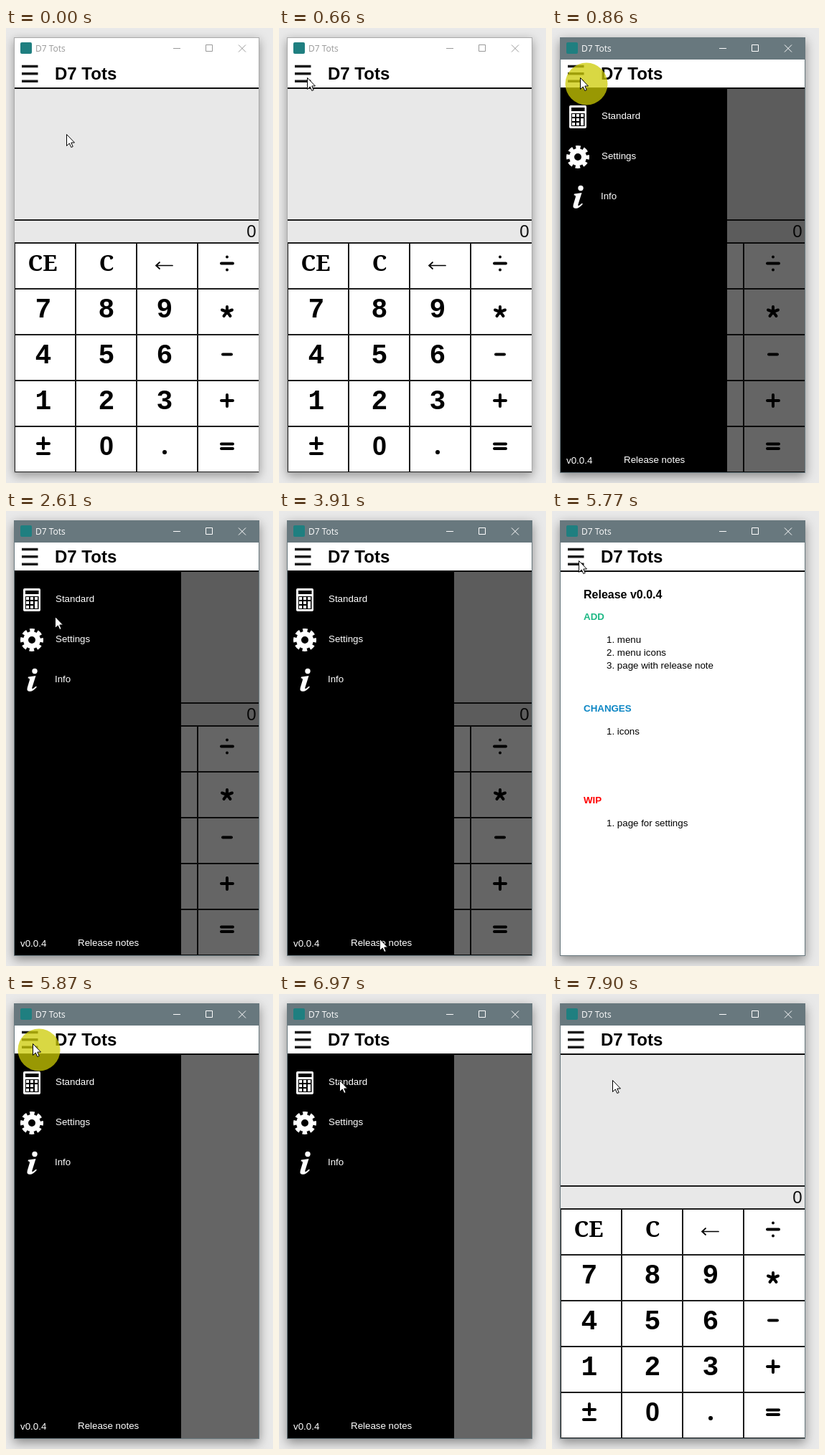
These frames come from a looping animation (372 px wide and 635 px high, 8000 ms). An HTML page:

```html
<!DOCTYPE html>
<html lang="en">
<head>
<meta charset="utf-8">
<title>Calculator</title>
<style>
html, body { margin: 0; width: 100%; height: 100%; overflow: hidden; background: #e9e9e9; }
svg { position: absolute; left: 0; top: 0; }
text { font: 13.333px "Liberation Sans", Arial, sans-serif; }
.b { font-weight: bold; }
#win { position: absolute; left: 11px; top: 13px; width: 342px; height: 608px; background: #aaa;
  box-shadow: 0 4px 13px rgba(0,0,0,.36); }
#win.on { background: #68787e; box-shadow: 0 5px 14px rgba(0,0,0,.42); }
#bar { fill: #fff; }
#caption { font: 12px "Open Sans", sans-serif; fill: #999; }
#buttons { fill: none; stroke: #999; }
.on #bar { fill: #68787e; }
.on #caption { fill: #fff; }
.on #buttons { stroke: #fff; }
#keys text { font: bold 38px "Liberation Mono", monospace; text-anchor: middle; }
#keys .serif { font: bold 31px "Noto Serif", serif; }
#keys .zero { font: bold 36px "Liberation Sans", sans-serif; }
</style>
</head>
<body>
<div id="win"></div>
<svg id="app" width="372" height="635" viewBox="0 0 372 635">
  <rect id="bar" x="12" y="14" width="340" height="30"/>
  <rect x="20" y="20" width="16" height="16" rx="2" fill="#1f7f80"/>
  <text id="caption" x="41" y="33">D7 Tots</text>
  <path id="buttons" d="M233 28.5h10M278.500 23.500h9v9h-9zM324 23.500l10 10m0-10l-10 10"/>
  <rect x="12" y="44" width="340" height="576" fill="#fff"/>

  <g id="calc">
    <rect x="12" y="85" width="340" height="215" fill="#e8e8e8"/>
    <text x="348.500" y="292" text-anchor="end" style="font-size:24px" fill="#111">0</text>
    <path d="M12 268h340M12 300h340M12 364h340M12 428h340M12 492h340M12 556h340M97 300v320M182 300v320M267 300v320" stroke="#1c1c1c" stroke-width="2"/>
    <path d="M12.500 300V619.500H352" fill="none" stroke="#1c1c1c"/>
    <g id="keys">
      <text class="serif" x="51" y="339" textLength="">CE</text>
      <text class="serif" x="140" y="339">C</text>
    </g>
    <g fill="none" stroke="#000" stroke-width="4" stroke-linecap="round">
      <path d="M209 331.500h23M214 327l-5 4.500 5 4.500" stroke-width="1.700"/>
      <path d="M300 328.500h16M308 319.500h0M308 337.500h0"/>
      <path d="M308 396v-7M308 396l7-2.500M308 396l4.500 6M308 396l-4.500 6M308 396l-7-2.500"/>
      <path d="M302 455.500h12M300 520h16M308 512v16M300 580.500h16M300 587h16"/>
      <path d="M44 580h16M52 572v15M44 594h16"/>
      <path d="M221 592h0" stroke-width="6"/>
    </g>
  </g>

  <g id="notes">
    <text class="b" x="44" y="122" style="font-size:16px">Release v0.0.4</text>
    <text class="b" x="44" y="152" fill="#1cb884">ADD</text>
    <text x="76" y="184">1. menu</text>
    <text x="76" y="202">2. menu icons</text>
    <text x="76" y="220">3. page with release note</text>
    <text class="b" x="44" y="280" fill="#0c86c4">CHANGES</text>
    <text x="76" y="312">1. icons</text>
    <text class="b" x="44" y="408" fill="#f00">WIP</text>
    <text x="76" y="440">1. page for settings</text>
  </g>

  <g id="menu">
    <rect x="12" y="85" width="340" height="535" fill-opacity=".605"/>
    <rect x="12" y="84" width="232" height="536"/>
    <g fill="#fff">
      <rect x="24" y="108" width="24" height="32" rx="2"/>
      <path d="M27 111h18.500v5H27zM27 119h18.500v18H27z" fill="#000"/>
      <path d="M28 120h4v4h-4zm6 0h4v4h-4zm6 0h4v4h-4zM28 126h4v4h-4zm6 0h4v4h-4zm6 0h4v10h-4zM28 132h4v4h-4zm6 0h4v4h-4z"/>
      <g fill="none" stroke="#fff">
        <circle cx="36" cy="180" r="8.500" stroke-width="7"/>
        <circle cx="36" cy="180" r="13.500" stroke-width="5" stroke-dasharray="6.400 4.203" stroke-dashoffset="3.200"/>
      </g>
      <circle cx="40" cy="223.500" r="3.700"/>
      <path d="M31 231.500l10.500-1.500-5 16q-1 3 1.500 1.500l4-3 .8 1.300q-5 6-9.500 6-5 0-3.500-5.500l3-10q.800-3-2.300-3z"/>
      <g class="b">
        <text x="69" y="127">Standard</text>
        <text x="69" y="183">Settings</text>
        <text x="68" y="239">Info</text>
        <text x="20" y="608">v0.0.4</text>
        <text x="100" y="607">Release notes</text>
      </g>
    </g>
  </g>

  <path d="M12 84h340" stroke="#0c0c0c" stroke-width="2"/>
  <path d="M22 53.500h22.500M22 63.800h22.500M22 74.200h22.500" stroke="#1a1a1a" stroke-width="3.600"/>
  <text class="b" x="68" y="72" style="font-size:24px">D7 Tots</text>

  <g id="pointer">
    <circle id="glow" cx="9" cy="9" r="29.500"/>
    <path d="M.500.500V16.500L4.300 13 6.800 18.500 9.200 17.500 6.800 12H11.500Z" fill="#fff" stroke="#000"/>
  </g>
</svg>
<script>
const $ = id => document.getElementById(id);

// Digit keys: three columns, three rows, then zero
const addKey = (label, x, y, cls = "") => {
  const el = document.createElementNS("http://www.w3.org/2000/svg", "text");
  el.setAttribute("x", x);
  el.setAttribute("y", y);
  el.setAttribute("class", cls);
  el.textContent = label;
  $("keys").append(el);
};
for (let n = 1; n <= 9; n++) {
  addKey(n, [52, 140, 221][(n - 1) % 3], 532 - 64 * Math.floor((n - 1) / 3));
}
addKey(0, 140, 596, "zero");

// Pointer moves: first step, last step, number of steps, end x, end y
const moves = [
  [200, 660, 6, 39, 69],
  [1400, 1680, 4, 68, 120],
  [2610, 2610, 1, 68, 147],
  [2700, 3350, 8, 94, 397],
  [3450, 3910, 6, 140, 597],
  [4750, 5490, 9, 37, 80],
  [5680, 5770, 2, 37, 69],
  [6430, 6790, 5, 83, 115],
  [6970, 6970, 1, 84, 120]
];
const clicks = [[860, 940], [4280, 4380], [5860, 5950], [7820, 7900]];

function pointerAt(t) {
  let x = 84, y = 148;
  for (const [start, end, steps, toX, toY] of moves) {
    if (t < start) break;
    const gap = (end - start) / (steps - 1) || 1;
    const p = Math.min(1, (Math.floor((t - start) / gap + 1e-6) + 1) / steps);
    x += (toX - x) * p;
    y += (toY - y) * p;
  }
  return [Math.round(x), Math.round(y)];
}

const show = (id, on) => { $(id).style.display = on ? "" : "none"; };

function draw() {
  const t = performance.now() % 8000;
  const within = (a, b) => t >= a && t < b;
  const active = t >= 860;
  const notes = within(4280, 7820);
  const menu = within(860, 4280) || within(5860, 7820);
  $("win").classList.toggle("on", active);
  $("app").classList.toggle("on", active);
  show("calc", !notes);
  show("notes", notes);
  show("menu", menu);
  show("glow", clicks.some(c => within(...c)));
  $("glow").setAttribute("fill", menu ? "rgba(205,203,5,.75)" : "rgba(255,255,0,.5)");
  $("pointer").setAttribute("transform", `translate(${pointerAt(t)})`);
  requestAnimationFrame(draw);
}
draw();
</script>
</body>
</html>
```
